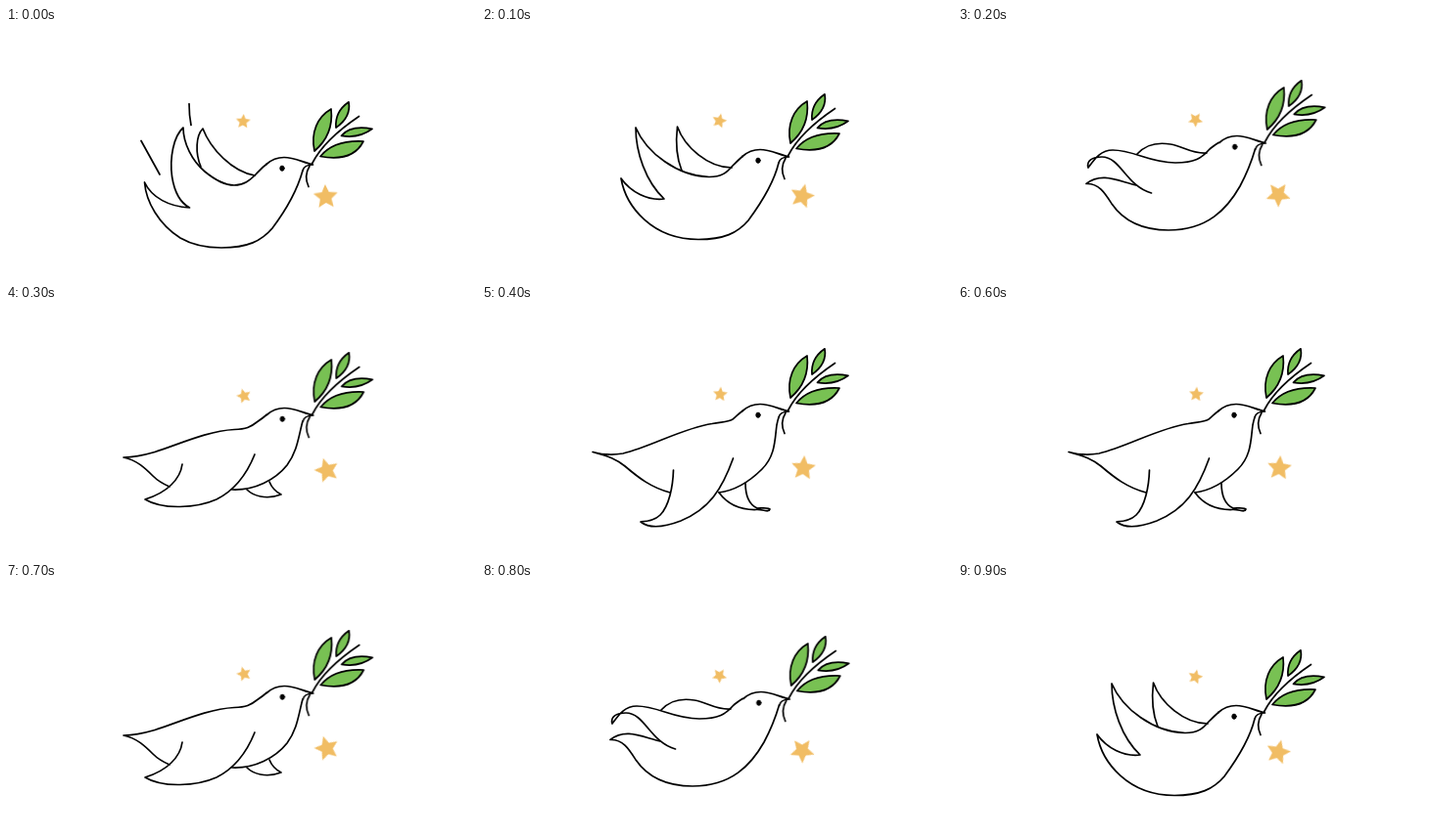
Recreate the animation shown at these times as an HTML page. Size 480 px wide and 256 px high, loop 1000 ms.

```html
<!DOCTYPE html>
<html lang="en">
<head>
<meta charset="utf-8">
<title>Dove with a branch</title>
<style>
html, body { margin: 0; width: 100%; height: 100%; overflow: hidden; background: #fff; }
svg { display: block; width: 100vw; height: 100vh; }
.ink { fill: none; stroke: #000; stroke-width: 1.7; stroke-linecap: round; stroke-linejoin: round; }
.leaf { fill: #78c153; }
.star { fill: #f1bd64; }

/* Ten held steps: wings go down through six poses and back up */
.pose, .head, .star { animation: 1s step-end infinite; }
.pose { opacity: 0; }
.up      { animation-name: up; }
.raised  { animation-name: raised; }
.level   { animation-name: level; }
.falling { animation-name: falling; }
.low     { animation-name: low; }
.down    { animation-name: down; }
.head    { animation-name: lift; }
.big     { animation-name: big; }
.small   { animation-name: small; }

@keyframes up      { 0% { opacity: 1 } 10%, 100% { opacity: 0 } }
@keyframes raised  { 0%, 20%, 100% { opacity: 0 } 10%, 90% { opacity: 1 } }
@keyframes level   { 0%, 30%, 90%, 100% { opacity: 0 } 20%, 80% { opacity: 1 } }
@keyframes falling { 0%, 40%, 80%, 100% { opacity: 0 } 30%, 70% { opacity: 1 } }
@keyframes low     { 0%, 50%, 70%, 100% { opacity: 0 } 40%, 60% { opacity: 1 } }
@keyframes down    { 0%, 60%, 100% { opacity: 0 } 50% { opacity: 1 } }

@keyframes lift {
  0%, 100% { transform: translate(0, 0) }
  10%, 90% { transform: translate(0, -8px) }
  20%, 80% { transform: translate(.7px, -22px) }
  30%, 70% { transform: translate(.3px, -28px) }
  40%, 60% { transform: translate(0, -32px) }
  50%      { transform: translate(0, -37px) }
}
@keyframes big {
  0%, 100% { transform: translate(326.5px, 173px) rotate(-3deg) }
  10%, 90% { transform: translate(327px, 172.3px) rotate(14deg) }
  20%, 80% { transform: translate(327px, 170.7px) rotate(35deg) }
  30%, 70% { transform: translate(327.6px, 168.4px) rotate(56deg) }
  40%, 60% { transform: translate(328.2px, 166px) rotate(77deg) }
  50%      { transform: translate(328.5px, 164.5px) rotate(90deg) }
}
@keyframes small {
  0%, 100% { transform: translate(242.2px, 95.8px) rotate(4deg) scale(.6) }
  10%, 90% { transform: translate(242.4px, 95.2px) rotate(14deg) scale(.6) }
  20%, 80% { transform: translate(242.5px, 94px) rotate(35deg) scale(.6) }
  30%, 70% { transform: translate(243px, 92.2px) rotate(56deg) scale(.6) }
  40%, 60% { transform: translate(243.3px, 90.5px) rotate(77deg) scale(.6) }
  50%      { transform: translate(243.5px, 89.5px) rotate(90deg) scale(.6) }
}
</style>
</head>
<body>
<svg viewBox="0 0 480 256">
  <defs>
    <path id="star" d="M0-13 3.6-5 12.4-4 5.8 1.900 7.600 10.500 0 6.100-7.600 10.500-5.800 1.900-12.400-4-3.600-5Z"/>
  </defs>

  <use href="#star" class="star small"/>
  <use href="#star" class="star big"/>

  <g class="ink">
    <g class="pose up">
      <path d="M187 77.500Q187 89 189 99.500M138 115.500 157 150"/>
      <path d="M266 139.500C261 143 258 147 255 150C249 156 243 161 233 161C223 161 214 156 203 147C190 136 181 118 181 102C171 111 167 133 169.500 152C172 168 178 179 187.500 184C167 183 149 174 141.500 158C143 178 156 201 178 215C190 222 205 225 220 225C247 225 261 218 272 205C287 185 298 164 303 146"/>
      <path d="M199 142C193 128 194 110 201 103C209 124 231 147 254 151"/>
    </g>

    <g class="pose raised">
      <path d="M266 131.500C262 135 259 138 256 141C250 148 245 152.500 232 152.500C200 152 168 128 157 102C157 127 167 157 186 175C169 177 152 168 142 154C147 183 174 216.500 221 216.500C247 216.500 261 210 272 197C286 178 298 159 303 138"/>
      <path d="M204 146C198 131 198 114 199.500 101C207 122 231 143 255 143"/>
    </g>

    <g class="pose level">
      <path d="M266 117.500C262 120 259 122 256 125C249 133 242 138 222 138C195 138 180 125 158 125C145 125 139 135 133 143C131 136 137 132 147 132C166 132 172 162 197.500 169"/>
      <path d="M182 161C164 157 147 147 131 159.500C144 159 150 169 157 180C168 196 186 207 215 207C255 207 275 185 288 162C296 147 300 136 303.500 124"/>
      <path d="M183 129C192 119 205 117 217 119C230 121 238 129 254 128"/>
    </g>

    <g class="pose falling">
      <path d="M266 111.500C262 115 259 117 256 119C250 124 245 126 233 126.500C205 128 176 142 152 149.500C140 153 130 155 120 155C134 158 142 166 150 174C155 179 160 182 167 185"/>
      <path d="M180 162C178 177 165 191 142 198C160 209 195 207 215 198C235 188 246 172 254 152"/>
      <path d="M231 188C254 189 275 178 287 163C298 148 299 132 303 118"/>
      <path d="M246 188C252 194 265 199 281 193C275 190 271 185 269 180"/>
    </g>

    <g class="pose low">
      <path d="M266 107.500C261 111 259 114 256 116C251 119 246 118.500 235 120.500C205 125 173 144 144 151C132 153 122 152 113 149.500C130 154 137 157 146 164C160 176 173 186 192 191"/>
      <path d="M195.500 168C195 185 191 205 182 214C176 220 168 220.500 162 221C172 229 190 225 203 220C232 208 245 188 256.500 156"/>
      <path d="M242 191C258 189 274 179 286 167C300 153 299 136 301 122Q302 117 303 114"/>
      <path d="M242 191C250 202 262 209 280 208.500C287 208 293 212 294 208C293 206 286 207 281 207C272 203 269 194 269 181"/>
    </g>

    <g class="pose down">
      <path d="M266 102.500C262 106 260 109 257 111C251 115 246 116 235 117.500C205 121 170 143 143 149C131 151 120 150 110.500 146.500C128 153 136 156 145 162C160 175 174 185 195 190"/>
      <path d="M197.500 167C199 187 197 211 187 225C183 231 178 235 172 236.500C184 241 203 231 214 222C236 204 249 181 258 153"/>
      <path d="M243 189C259 186 274 176 286 164C300 150 299 132 301 117Q302 112 303 109"/>
      <path d="M243 189C249 203 260 214 279 218C286 219 291 222 292 218C291 216 286 217 281 215C272 208 269 194 269 178"/>
    </g>

    <g class="head">
      <path d="M266 139.500C272 134 277 132.500 284 132.500C294 132.500 303 137.500 313.500 140C307 140 304 142 303 146"/>
      <path d="M360.500 90.500C342 103 322 120 312.500 139M310 141.500C306 148 306 156 309 162.500"/>
      <ellipse cx="282" cy="143.700" rx="2.200" ry="2.600" fill="#000" stroke-width="1"/>
      <g class="leaf">
        <path d="M315 126C311 107 318 91 332 83C334 101 328 115 315 126Z"/>
        <path d="M337 102C336 90 341 82 350 75.800C352 87 347 95 337 102Z"/>
        <path d="M342.500 110.300C350 101.500 362 101 374 103.300C365 110 355 112.500 342.500 110.300Z"/>
        <path d="M321 131.500C331 119 346 115 365 116C357 132 340 135 321 131.500Z"/>
      </g>
    </g>
  </g>
</svg>
</body>
</html>
```
